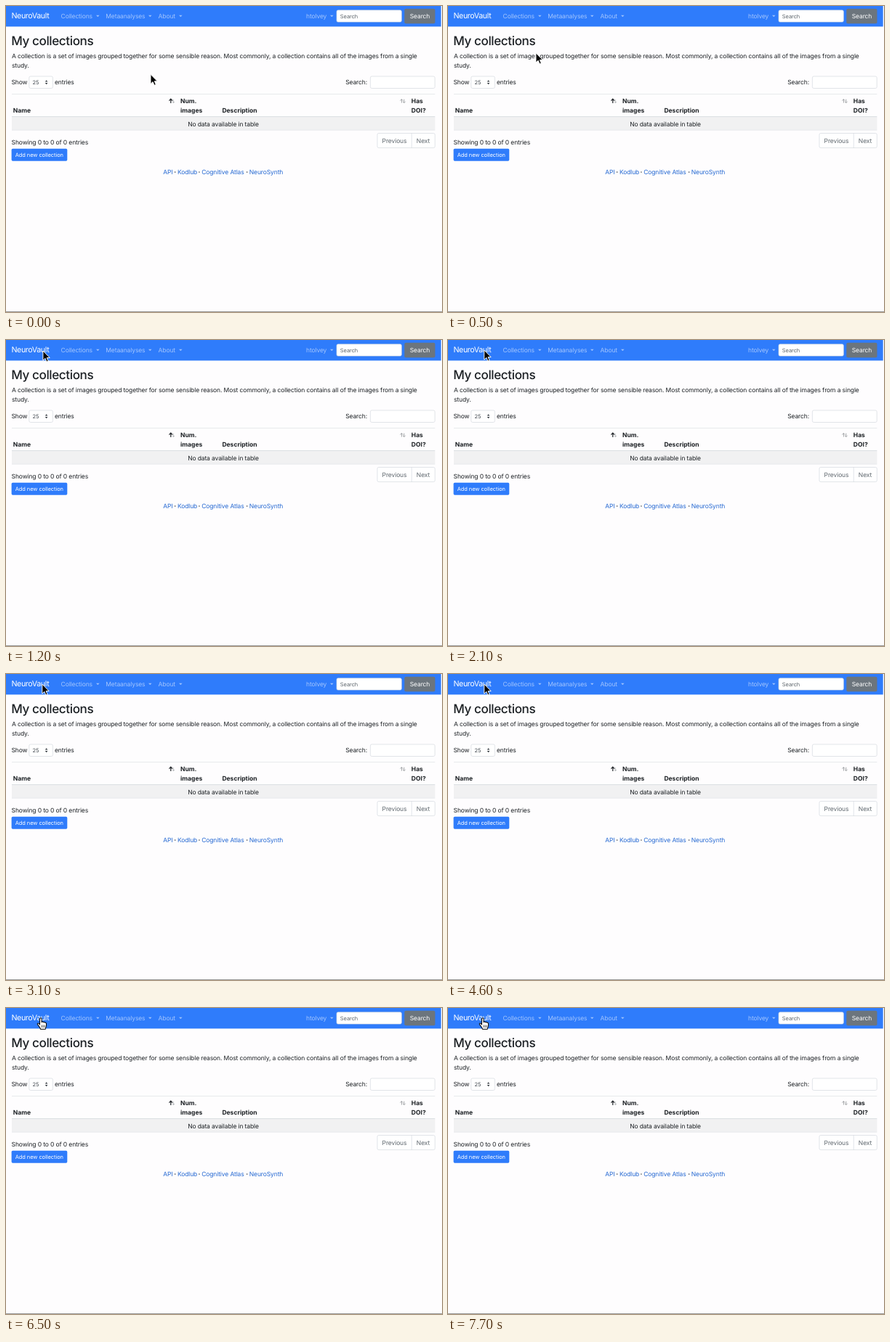
An HTML page for the animation above (8000 ms loop, 600 by 422 pixels).

```html
<!DOCTYPE html>
<html lang="en">
<head>
<meta charset="utf-8">
<title>My collections</title>
<style>
  html, body { margin: 0; width: 100%; height: 100%; overflow: hidden; background: #fefdfe; }
  svg { display: block; width: 600px; height: 422px; }
  text {
    font: 8.53px Inter, "Open Sans", sans-serif;
    letter-spacing: -.0148em;
    fill: #1c2024;
    text-rendering: geometricPrecision;
  }
  .brand { font-size: 10.67px; letter-spacing: -.034em; fill: #fff; }
  .title { font-size: 17.07px; font-weight: 500; letter-spacing: -.023em; }
  .head { font-weight: 700; letter-spacing: 0; }
  .small { font-size: 7.47px; letter-spacing: -.008em; }
  .nav { fill: #a3c5fd; }
  .white { fill: #fff; }
  .muted { fill: #5f676e; }
  .dark { fill: #40474e; }
  .link { fill: #2468d2; }
  .mid { text-anchor: middle; }
  .field { fill: #fff; stroke: #ced4da; stroke-width: .6; }
</style>
</head>
<body>
<svg id="stage" viewBox="0 0 600 422">
  <rect width="600" height="422" fill="#fefdfe"/>
  <rect width="598.7" height="28.4" fill="#2f7cfb"/>
  <rect x="455" y="5.7" width="89.4" height="16.4" rx="2" class="field"/>
  <rect x="548.3" y="3.8" width="42.2" height="20.4" rx="2" fill="#6c757d"/>

  <rect x="31.8" y="97" width="32.6" height="16.5" rx="2" class="field"/>
  <path d="M53.8 104.6l1.8-2.3 1.8 2.3zM53.8 106l1.8 2.3 1.8-2.3z" fill="#343a40"/>
  <rect x="501.4" y="97" width="88.8" height="16.5" rx="2" class="field"/>

  <rect x="8" y="153" width="582.4" height="18" fill="#f1f1f2"/>
  <path d="M8 121.5H590.4M8 171.2H590.4" stroke="#dee2e6" stroke-width=".7"/>
  <path d="M8 152.6H590.4" stroke="#dadee2"/>
  <g fill="none">
    <path d="M226.8 134v-5.8m-2.3 2.4l2.3-2.5 2.3 2.5" stroke="#212529" stroke-width="1.2"/>
    <path d="M230.2 129v4.8m-.5-1.6l.7 1.5 1.5-1.7" stroke="#b4b7ba"/>
    <path d="M544.4 133.6v-5m-1.8 1.9l1.8-2 1.8 2M547.8 128.6v5m-1.8-1.9l1.8 2 1.8-2" stroke="#a6a9ac"/>
  </g>

  <rect x="511" y="175.5" width="79.3" height="20.1" rx="2" class="field"/>
  <path d="M558.3 175.5v20.1" class="field"/>
  <rect x="7.6" y="196.8" width="76.7" height="17" rx="1.7" fill="#2f7cfb"/>
  <path d="M0 421.5H600" stroke="#9a9a9a"/>

  <g id="labels"></g>

  <g id="arrow">
    <path transform="scale(1.06)" d="M0 0V12.4L2.9 9.7 4.8 14.2 6.9 13.3 5 9H8.8Z" fill="#000" stroke="#fff" stroke-width=".9" stroke-linejoin="round"/>
  </g>
  <g id="hand">
    <g transform="scale(1.13)" stroke="#000" stroke-linejoin="round">
      <path d="M-1.2 1.2C-1.2-.4 1.1-.4 1.1 1.2V5C1.9 4.2 3.2 4.4 3.3 5.2 3.9 4.7 5 4.9 5.1 5.7 5.7 5.3 6.8 5.6 6.8 6.7V9.5C6.8 11 5.9 11.6 5.7 13.6H-.3C-.5 12.2-1.4 11.4-2.2 10L-3.8 7.9C-4.6 6.6-3.2 5.9-2.3 6.8L-1.2 8Z" fill="#fff" stroke-width=".9"/>
      <path d="M1.2 8.6v3M3 8.6v3M4.8 8.6v3" stroke-width=".6"/>
    </g>
  </g>
</svg>
<script>
const NS = 'http://www.w3.org/2000/svg';
const LOOP = 8000, STEP = 100, HAND_AT = 4900;
const el = id => document.getElementById(id);

function add(tag, attrs, text = '') {
  const node = document.createElementNS(NS, tag);
  for (const key in attrs) node.setAttribute(key, attrs[key]);
  node.textContent = text;
  el('labels').append(node);
}
const label = (x, y, text, cls = '') => add('text', { x, y, class: cls }, text);
const caret = x => add('path', { d: `M${x} 12.7h4.6l-2.3 2.4z`, class: 'nav' });

label(7.4, 17.4, 'NeuroVault', 'brand');
label(75.6, 16.8, 'Collections', 'nav');
label(137.3, 16.8, 'Metaanalyses', 'nav');
label(209.6, 16.8, 'About', 'nav');
label(413, 16.8, 'htolvey', 'nav');
[124, 196, 238, 446].forEach(caret);
label(459.8, 16.7, 'Search', 'small muted');
label(569.5, 17, 'Search', 'white mid');

label(7.2, 54, 'My collections', 'title');
label(8, 72.3, 'A collection is a set of images grouped together for some sensible reason. Most commonly, a collection contains all of the images from a single');
label(8, 85, 'study.');
label(7.4, 107.6, 'Show');
label(36.4, 108, '25', 'small dark');
label(67, 107.6, 'entries');
label(467.2, 107.8, 'Search:');

label(9.8, 146.7, 'Name', 'head');
label(240, 134, 'Num.', 'head');
label(240, 146.7, 'images', 'head');
label(297.4, 146.7, 'Description', 'head');
label(557.8, 134, 'Has', 'head');
label(557.8, 146.7, 'DOI?', 'head');
label(299, 165.6, 'No data available in table', 'mid');

label(7.6, 191.3, 'Showing 0 to 0 of 0 entries');
label(534.5, 188.6, 'Previous', 'muted mid');
label(574, 188.6, 'Next', 'muted mid');
label(45.8, 208.2, 'Add new collection', 'small white mid');

label(216.2, 232.2, 'API', 'link');
label(235.9, 232.2, 'Kodlub', 'link');
label(269.2, 232.2, 'Cognitive Atlas', 'link');
label(334.8, 232.2, 'NeuroSynth', 'link');
[232.8, 266, 331.6].forEach(x => label(x, 232.2, '·', 'head mid'));

// Pointer path: time, x, y
const path = [
  [0, 199, 94.3], [100, 199, 94.3], [200, 190, 91.5], [500, 121, 64.8],
  [700, 86, 43], [900, 61, 23.8], [1000, 55, 18.5], [1100, 52, 16],
  [1300, 49.8, 14], [4600, 49.8, 14], [5200, 47.8, 13.8], [LOOP, 47.8, 13.8]
];

function pointAt(t) {
  const i = path.findIndex(p => p[0] > t);
  const [t0, x0, y0] = path[i - 1], [t1, x1, y1] = path[i];
  const k = (t - t0) / (t1 - t0);
  return [x0 + (x1 - x0) * k, y0 + (y1 - y0) * k];
}

function draw(ms) {
  const t = Math.floor(ms % LOOP / STEP) * STEP;
  const move = `translate(${pointAt(t)})`;
  const onLink = t >= HAND_AT;
  el('arrow').setAttribute('transform', move);
  el('hand').setAttribute('transform', move);
  el('arrow').setAttribute('visibility', onLink ? 'hidden' : 'visible');
  el('hand').setAttribute('visibility', onLink ? 'visible' : 'hidden');
}

const start = performance.now();
function tick() {
  draw(performance.now() - start);
  requestAnimationFrame(tick);
}
tick();
</script>
</body>
</html>
```
